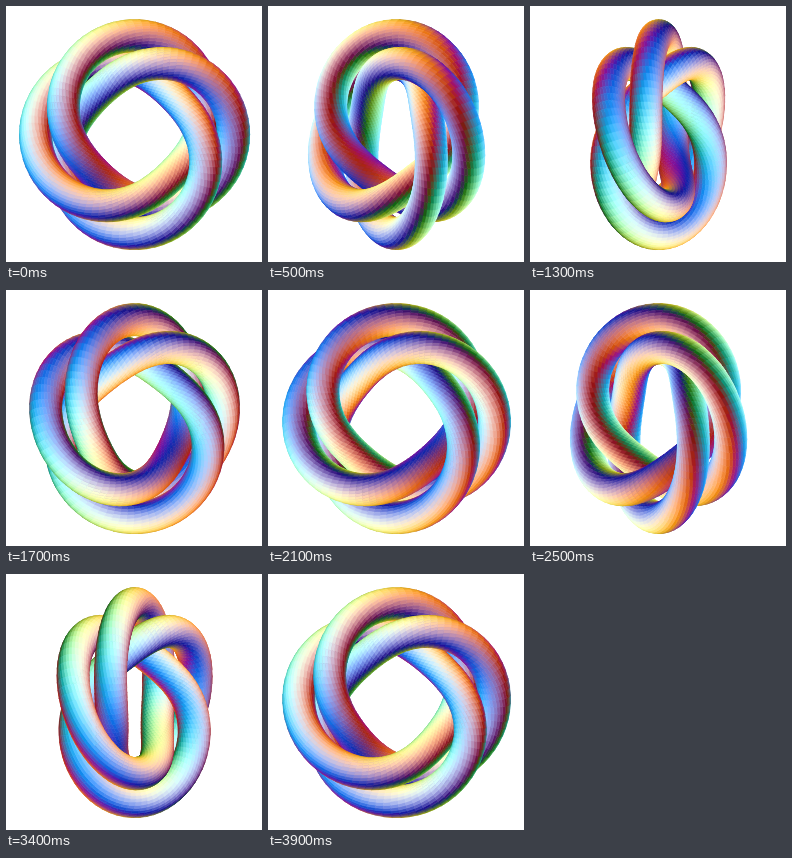
Animation of 256x256 px, one loop 4 s. Source, as an HTML page with a canvas:

```html
<!DOCTYPE html>
<html lang="en">
<head>
<meta charset="utf-8">
<title>Rotating torus knot</title>
<style>
html, body { margin: 0; width: 100%; height: 100%; overflow: hidden; background: #fff; }
canvas { display: block; width: 256px; height: 256px; }
</style>
</head>
<body>
<canvas id="stage" width="256" height="256"></canvas>
<script>
const ctx = document.getElementById('stage').getContext('2d');
const CENTER = 128.6, MAJOR = 77, MINOR = 22, TUBE = 16;
const ALONG = 270, AROUND = 32, STEPS = 40, STEP_MS = 100;
const TAU = Math.PI * 2;

const dot = (a, b) => a[0] * b[0] + a[1] * b[1] + a[2] * b[2];
const mix = (a, b, k) => a.map((v, i) => v + b[i] * k);
const unit = a => a.map(v => v / Math.hypot(...a));
const cross = (a, b) => [
  a[1] * b[2] - a[2] * b[1],
  a[2] * b[0] - a[0] * b[2],
  a[0] * b[1] - a[1] * b[0]
];

// Two-sided red, green and blue lights that turn with the knot
const LIGHTS = [[0, 1, 1], [-1, 1, 1], [-1, 0, 1]].map(unit);
const AMBIENT = 0.06;

function shade(n) {
  const rgb = LIGHTS.map(l =>
    Math.round(255 * Math.min(1, AMBIENT + Math.abs(dot(n, l)))));
  return `rgb(${rgb})`;
}

// (3,4) torus knot
function knot(t) {
  const w = t * 4 / 3, r = MAJOR + MINOR * Math.cos(w);
  return [r * Math.cos(t), r * Math.sin(t), MINOR * Math.sin(w)];
}

function frameAt(t) {
  const pos = knot(t), w = t * 4 / 3;
  const tan = unit(mix(knot(t + 0.001), knot(t - 0.001), -1));
  const out = [Math.cos(w) * Math.cos(t), Math.cos(w) * Math.sin(t), Math.sin(w)];
  const a = unit(mix(out, tan, -dot(out, tan)));
  return { pos, a, b: cross(tan, a) };
}

function normalAt(f, u) {
  const c = Math.cos(u), s = Math.sin(u);
  return f.a.map((v, i) => v * c + f.b[i] * s);
}

const points = [], faces = [];
for (let i = 0; i < ALONG; i++) {
  const f = frameAt(i / ALONG * 3 * TAU);
  const mid = frameAt((i + 0.5) / ALONG * 3 * TAU);
  for (let j = 0; j < AROUND; j++) {
    const j2 = (j + 1) % AROUND, i2 = (i + 1) % ALONG;
    const normal = normalAt(mid, (j + 0.5) / AROUND * TAU);
    points.push(mix(f.pos, normalAt(f, j / AROUND * TAU), TUBE));
    faces.push({
      ids: [i * AROUND + j, i2 * AROUND + j, i2 * AROUND + j2, i * AROUND + j2],
      center: mix(mid.pos, normal, TUBE),
      normal,
      color: shade(normal)
    });
  }
}

function draw(angle) {
  const c = Math.cos(angle), s = Math.sin(angle);
  const depth = p => p[2] * c + p[0] * s;
  const flat = points.map(p => [CENTER + p[0] * c - p[2] * s, CENTER - p[1]]);
  const front = faces.filter(f => depth(f.normal) > -0.05);
  for (const f of front) f.depth = depth(f.center);
  front.sort((p, q) => p.depth - q.depth);

  ctx.fillStyle = '#fff';
  ctx.fillRect(0, 0, 256, 256);
  ctx.lineWidth = 0.6;
  ctx.lineJoin = 'round';
  for (const f of front) {
    ctx.fillStyle = ctx.strokeStyle = f.color;
    ctx.beginPath();
    for (const id of f.ids) ctx.lineTo(flat[id][0], flat[id][1]);
    ctx.closePath();
    ctx.fill();
    ctx.stroke();
  }
}

let shown = -1;
function tick() {
  const step = Math.floor(performance.now() / STEP_MS) % STEPS;
  if (step !== shown) draw(step / STEPS * TAU);
  shown = step;
  requestAnimationFrame(tick);
}
tick();
</script>
</body>
</html>
```
